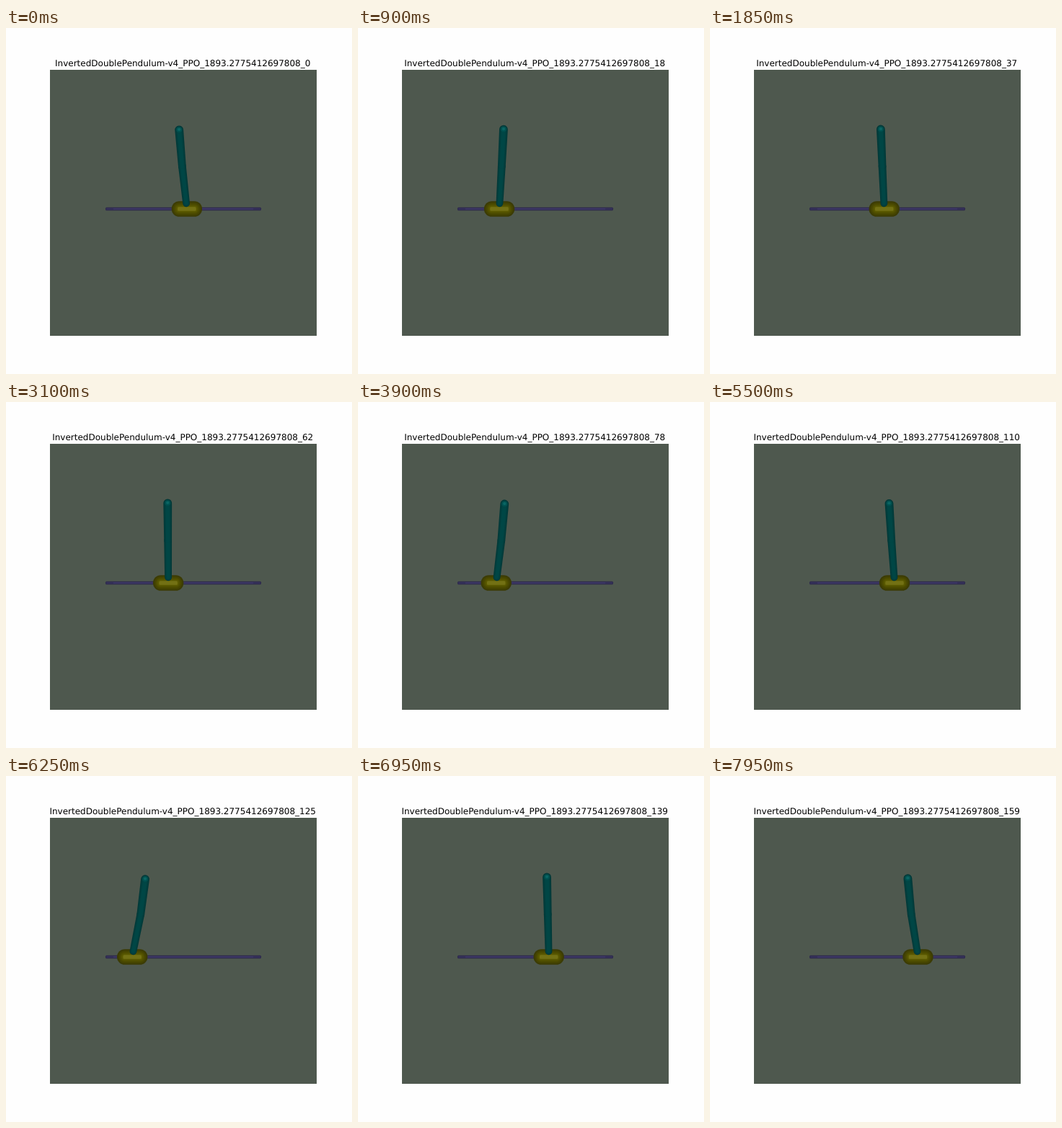
An HTML page with a canvas for the animation above (8000 ms loop, 480x480 px).

```html
<!DOCTYPE html>
<html lang="en">
<head>
<meta charset="utf-8">
<title>Inverted double pendulum</title>
<style>
  html, body { margin: 0; width: 100%; height: 100%; overflow: hidden; background: #fefefe; }
  canvas { display: block; width: 480px; height: 480px; }
</style>
</head>
<body>
<canvas id="stage" width="480" height="480"></canvas>
<script>
const ctx = document.getElementById('stage').getContext('2d');
const LOOP = 8000, STEP = 50;
const RAIL_Y = 251;
const PERIOD = 2.56, FIRST_CREST = 2.38;

// A slowly growing swing: cart position, and offset of the pole tip from the cart
function pose(s) {
  const phase = 2 * Math.PI * (s - FIRST_CREST) / PERIOD;
  const c = Math.cos(phase), n = Math.sin(phase);
  const leftmost = 194.7 - 3.15 * s, reach = 29.5 + 6.6 * s;
  return {
    x: leftmost + reach * (1 + c),
    lean: -3 + 0.25 * s - (8.5 + 1.7 * s) * c - 0.45 * s * n
  };
}

function capsule(x, y, halfWidth, halfHeight, color, radius = halfHeight) {
  ctx.fillStyle = color;
  ctx.beginPath();
  ctx.roundRect(x - halfWidth, y - halfHeight, halfWidth * 2, halfHeight * 2, radius);
  ctx.fill();
}

function taper(p, q, scale, color) {
  const angle = Math.atan2(q.y - p.y, q.x - p.x), side = Math.PI / 2;
  ctx.fillStyle = color;
  ctx.beginPath();
  ctx.arc(q.x, q.y, q.r * scale, angle - side, angle + side);
  ctx.arc(p.x, p.y, p.r * scale, angle + side, angle + 3 * side);
  ctx.fill();
}

function drawRail() {
  capsule(246, RAIL_Y, 108, 2.2, '#2e2b4d', 1.5);
  capsule(246, RAIL_Y, 107, 1, '#3d3865');
  for (const x of [144, 348]) capsule(x, RAIL_Y, 5, 0.5, '#2f2b50');
}

function drawCart(x) {
  const shades = ['#3c3c05', '#464500', '#4f4e00', '#595800'];
  shades.forEach((color, i) => capsule(x, RAIL_Y, 21.2 - 2 * i, 10.8 - 2 * i, color));
  capsule(x, RAIL_Y, 12.8, 2.8, '#737114', 1.5);
}

function drawPole(x, lean) {
  const bend = Math.max(-2, Math.min(2, 0.0006 * lean ** 3));
  const base = { x: x + lean * 0.07, y: 243.3, r: 4.9 };
  const joint = { x: x + lean * 0.536 + bend, y: 192, r: 5.4 };
  const tip = { x: x + lean, y: 140.3 + lean * lean * 0.009, r: 5.9 };
  const shades = [[1, '#023938'], [0.8, '#003f3e'], [0.5, '#004645']];
  for (const [scale, color] of shades) {
    taper(base, joint, scale, color);
    taper(joint, tip, scale, color);
  }
  capsule(tip.x, tip.y - 0.3, 4, 3.8, '#00504f');
  capsule(tip.x, tip.y - 0.6, 2.2, 2, '#0a6563');
}

function drawTitle(count) {
  ctx.fillStyle = '#000';
  ctx.font = '12px "DejaVu Sans", sans-serif';
  ctx.textAlign = 'center';
  ctx.textRendering = 'geometricPrecision';
  ctx.fillText('InvertedDoublePendulum-v4_PPO_1893.2775412697808_' + count, 245.2, 53);
}

function draw(count) {
  const { x, lean } = pose(count * STEP / 1000);
  ctx.fillStyle = '#fefefe';
  ctx.fillRect(0, 0, 480, 480);
  ctx.fillStyle = '#4e584e';
  ctx.fillRect(61, 58, 370, 369);
  drawRail();
  drawCart(x);
  drawPole(x, lean);
  drawTitle(count);
}

const start = performance.now();
function tick() {
  const elapsed = Math.max(0, performance.now() - start) % LOOP;
  draw(Math.floor(elapsed / STEP));
  requestAnimationFrame(tick);
}
tick();
</script>
</body>
</html>
```
